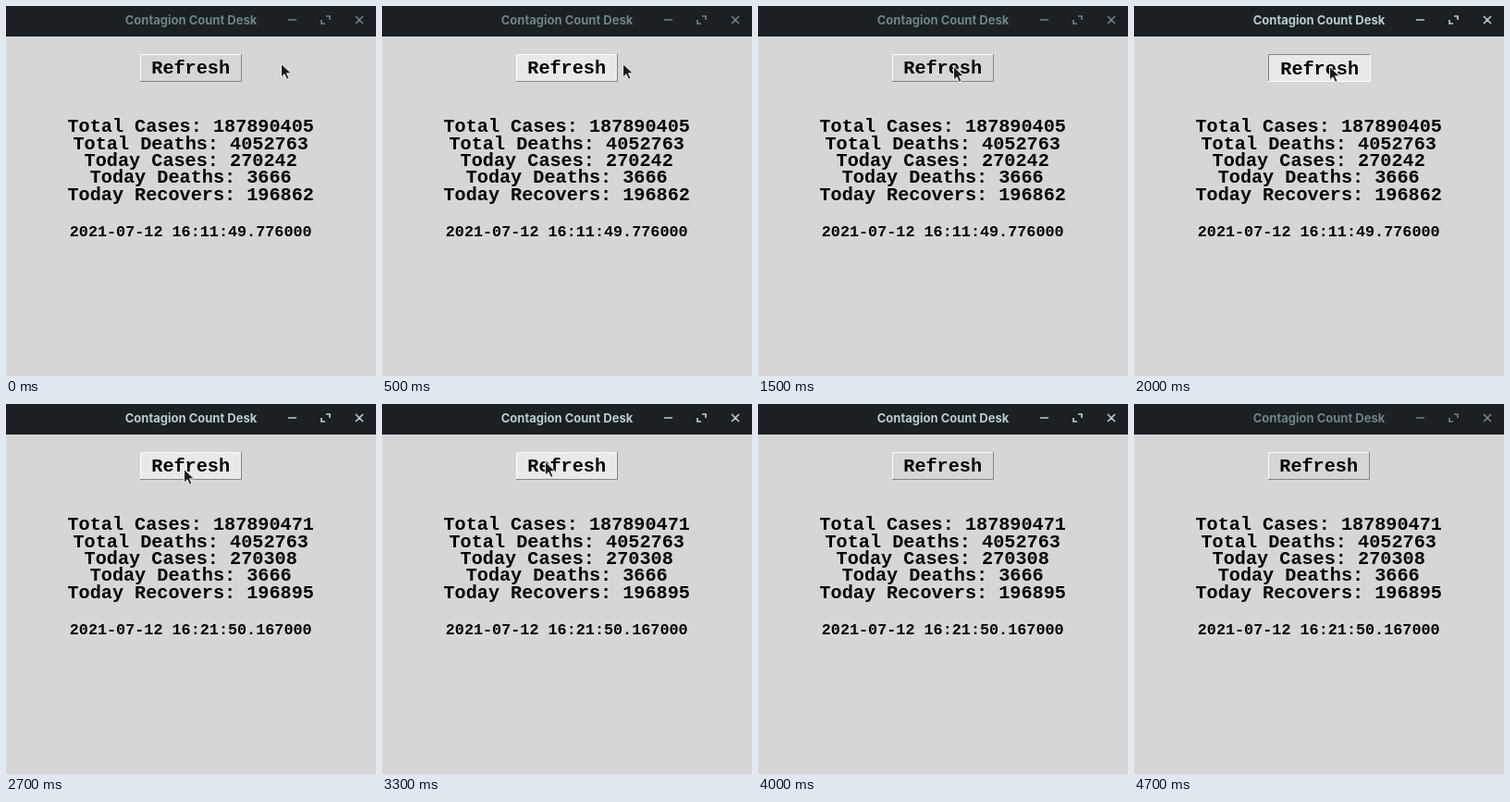
These frames come from a looping animation (400 by 400 pixels, 4800 ms). An HTML page:

```html
<!DOCTYPE html>
<html lang="en">
<head>
<meta charset="utf-8">
<title>Contagion Count Desk</title>
<style>
  html, body { margin: 0; width: 100%; height: 100%; overflow: hidden; background: #d6d6d6; }
  svg { display: block; width: 100vw; height: 100vh; }
  text { text-anchor: middle; }

  .bar, .face, .label, .raised, .sunken, .before, .after, .pointer {
    animation: 4.8s step-end infinite;
  }

  .bar { color: #70818b; animation-name: focus; }
  .bar text { font: 700 13px Inter, sans-serif; fill: currentColor; }
  .bar path { fill: none; stroke: currentColor; stroke-width: 1.7; }

  .label, .stats { font: 700 20.2px "Liberation Mono", monospace; }
  .stamp { font: 700 16.8px "Liberation Mono", monospace; }

  .face { fill: #d6d6d6; animation-name: hover; }
  .label { animation-name: press; }
  .edge path { fill: none; stroke-width: 1; }
  .raised { animation-name: hide-down; }
  .sunken { visibility: hidden; animation-name: show-down; }
  .light { stroke: #fbfbfb; }
  .dark { stroke: #858585; }

  .before { animation-name: old; }
  .after { visibility: hidden; animation-name: fresh; }
  .pointer { animation-name: move; }

  @keyframes focus {
    0%, 97.9166% { color: #70818b; }
    41.6666% { color: #b9cad3; }
  }
  @keyframes hover {
    0%, 31.25%, 70.8333% { fill: #d6d6d6; }
    10.4166%, 41.6666% { fill: #e9e9e9; }
  }
  @keyframes press {
    0%, 47.9166% { transform: none; }
    41.6666% { transform: translate(1px, 1px); }
  }
  @keyframes hide-down {
    0%, 47.9166% { visibility: visible; }
    41.6666% { visibility: hidden; }
  }
  @keyframes show-down {
    0%, 47.9166% { visibility: hidden; }
    41.6666% { visibility: visible; }
  }
  @keyframes old {
    0% { visibility: visible; }
    47.9166%, 100% { visibility: hidden; }
  }
  @keyframes fresh {
    0% { visibility: hidden; }
    47.9166%, 100% { visibility: visible; }
  }
  @keyframes move {
    0% { transform: translate(297px, 62px); }
    2.0833% { transform: translate(275px, 62px); }
    4.1666% { transform: translate(260px, 62px); }
    12.5% { transform: translate(250px, 63px); }
    14.5833% { transform: translate(240px, 64px); }
    16.6666% { transform: translate(230px, 66px); }
    18.75% { transform: translate(220px, 66px); }
    20.8333% { transform: translate(211px, 65px); }
    54.1666% { transform: translate(202px, 68px); }
    56.25% { transform: translate(192px, 70px); }
    68.75% { transform: translate(176px, 62px); }
    70.8333% { transform: translate(157px, 52px); }
    72.9166% { transform: translate(140px, 43px); }
    75% { transform: translate(125px, 35px); }
    77.0833% { transform: translate(111px, 28px); }
    81.25% { transform: translate(105px, 10px); }
    83.3333%, 100% { transform: translate(-40px, 10px); }
  }
</style>
</head>
<body>
<svg viewBox="0 0 400 400">
  <rect width="400" height="400" fill="#d6d6d6"/>

  <rect width="400" height="33" fill="#1a2023"/>
  <g class="bar">
    <text x="200" y="19.5">Contagion Count Desk</text>
    <path d="M305 15H314M346 11H350V15M345 19H341V15M378 11L386 19M386 11L378 19"/>
  </g>

  <rect class="face" x="145" y="52" width="110" height="30"/>
  <g class="edge raised">
    <path class="light" d="M145.5 82V52.5H255"/>
    <path class="dark" d="M145 81.5H254.5V52"/>
  </g>
  <g class="edge sunken">
    <path class="dark" d="M145.5 82V52.5H255"/>
    <path class="light" d="M145 81.5H255.5V52"/>
  </g>
  <text class="label" x="199.7" y="73">Refresh</text>

  <g class="stats">
    <text x="199.7" y="154.5">Total Deaths: 4052763</text>
    <text x="199.7" y="191.3">Today Deaths: 3666</text>
  </g>
  <g class="before">
    <g class="stats">
      <text x="199.7" y="136">Total Cases: 187890405</text>
      <text x="199.7" y="173">Today Cases: 270242</text>
      <text x="199.7" y="209.7">Today Recovers: 196862</text>
    </g>
    <text class="stamp" x="199.7" y="248.5">2021-07-12 16:11:49.776000</text>
  </g>
  <g class="after">
    <g class="stats">
      <text x="199.7" y="136">Total Cases: 187890471</text>
      <text x="199.7" y="173">Today Cases: 270308</text>
      <text x="199.7" y="209.7">Today Recovers: 196895</text>
    </g>
    <text class="stamp" x="199.7" y="248.5">2021-07-12 16:21:50.167000</text>
  </g>

  <path class="pointer" d="M.5 .5V15L4 11.8L6.6 17.3L9 16.2L6.5 10.8H11.4Z"
        fill="#1c1c1c" stroke="#ececec" stroke-width="1"/>
</svg>
</body>
</html>
```
